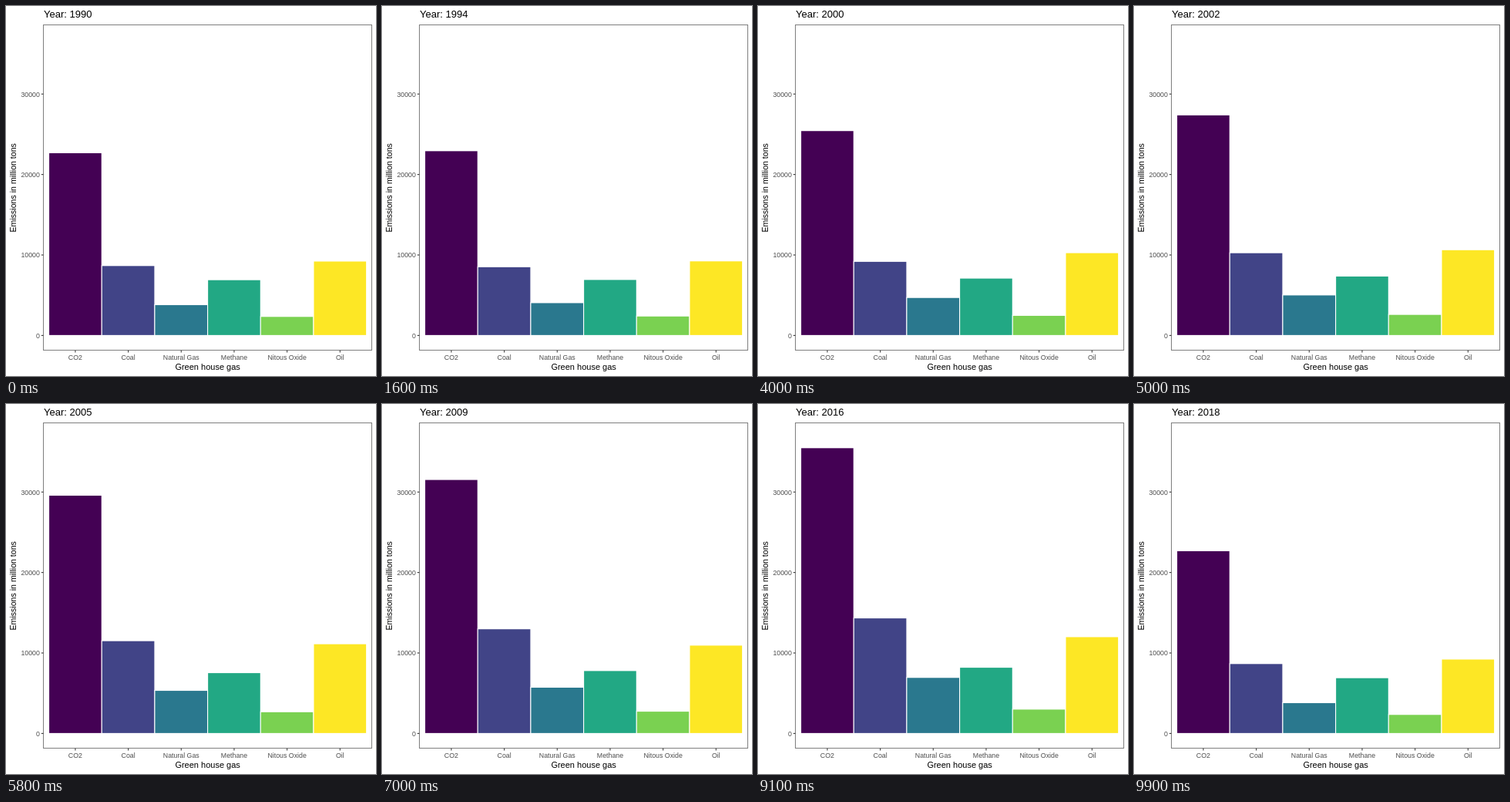
An HTML page with a canvas for the animation above (10 s loop, 480 by 480 pixels).

```html
<!DOCTYPE html>
<html lang="en">
<head>
<meta charset="utf-8">
<title>Emissions by year</title>
<style>
  html, body { margin: 0; width: 100%; height: 100%; overflow: hidden; background: #fff; }
  canvas { display: block; width: 480px; height: 480px; }
</style>
</head>
<body>
<canvas id="chart" width="480" height="480"></canvas>
<script>
const ctx = document.getElementById('chart').getContext('2d');
const FONT = '"Liberation Sans", Arial, sans-serif';
const LOOP = 10000, STEP = 100, FIRST = 1990, YEARS = 29;
const LEFT = 55.57, BAR = 68.68, ZERO = 427.4, PER_K = 10.44;

// Key years, and each gas in thousand million tons at those years
const KEYS = [1990, 1994, 2000, 2002, 2005, 2009, 2012, 2016, 2018];
const gases = [
  { name: 'CO2', color: '#440154', points: [22.7, 22.95, 25.45, 26.3, 29.6, 31.55, 35, 35.5, 36.8] },
  { name: 'Coal', color: '#414487', points: [8.68, 8.53, 9.2, 9.65, 11.52, 13, 14.8, 14.35, 14.75] },
  { name: 'Natural Gas', color: '#2A788E', points: [3.82, 4.07, 4.71, 4.87, 5.35, 5.74, 6.45, 6.96, 7.48] },
  { name: 'Methane', color: '#22A884', points: [6.92, 6.95, 7.12, 7.29, 7.55, 7.81, 8, 8.22, 8.3] },
  { name: 'Nitous Oxide', color: '#7AD151', points: [2.36, 2.41, 2.49, 2.57, 2.69, 2.76, 2.87, 3.02, 3.06] },
  { name: 'Oil', color: '#FDE725', points: [9.24, 9.26, 10.28, 10.4, 11.14, 10.97, 11.5, 12.02, 12.29] }
];

function valueIn(year, points) {
  const k = Math.max(1, KEYS.findIndex(key => key >= year));
  const f = (year - KEYS[k - 1]) / (KEYS[k] - KEYS[k - 1]);
  return points[k - 1] + f * (points[k] - points[k - 1]);
}

// Steps per year; in the last one the bars already show the next year
const stepsIn = i => i < 12 || i === 13 ? 4 : 3;

function stateAt(ms) {
  let step = Math.floor((ms % LOOP) / STEP), i = 0;
  while (step >= stepsIn(i)) step -= stepsIn(i++);
  const ahead = step === stepsIn(i) - 1 ? 1 : 0;
  return { year: FIRST + i, barYear: FIRST + (i + ahead) % YEARS };
}

function text(str, x, y, size, color, align) {
  ctx.font = `${size}px ${FONT}`;
  ctx.fillStyle = color;
  ctx.textAlign = align;
  ctx.fillText(str, x, y);
}

function line(x1, y1, x2, y2) {
  ctx.beginPath();
  ctx.moveTo(x1, y1);
  ctx.lineTo(x2, y2);
  ctx.stroke();
}

// Fill on whole pixels, outline at the exact position
function bar(x, y, w, h, color) {
  const left = Math.round(x), top = Math.round(y);
  ctx.fillStyle = color;
  ctx.fillRect(left, top, Math.round(x + w) - left, Math.round(y + h) - top);
  ctx.strokeRect(x, y, w, h);
}

function drawBars(year) {
  ctx.lineWidth = 1.07;
  ctx.strokeStyle = '#fff';
  gases.forEach(({ color, points }, i) => {
    const h = valueIn(year, points) * PER_K;
    bar(LEFT + i * BAR, ZERO - h, BAR, h, color);
  });
}

function drawAxes() {
  ctx.lineWidth = 1;
  ctx.strokeStyle = '#7f7f7f';
  ctx.strokeRect(48.5, 24.5, 426, 422);
  ctx.lineWidth = 1.07;
  ctx.strokeStyle = '#333';
  for (let v = 0; v <= 30; v += 10) {
    const y = ZERO - v * PER_K;
    line(45.8, y, 48.5, y);
    text(v * 1000, 43.9, y + 3.4, 8.8, '#4d4d4d', 'right');
  }
  gases.forEach(({ name }, i) => {
    const x = LEFT + (i + 0.5) * BAR;
    line(x, 446.8, x, 449.5);
    text(name, x, 459, 8.8, '#4d4d4d', 'center');
  });
  text('Green house gas', 261.6, 472, 11, '#000', 'center');
  ctx.save();
  ctx.translate(13, 235.8);
  ctx.rotate(-Math.PI / 2);
  text('Emissions in million tons', 0, 0, 10.6, '#000', 'center');
  ctx.restore();
}

function draw(ms) {
  const { year, barYear } = stateAt(ms);
  ctx.fillStyle = '#fff';
  ctx.fillRect(0, 0, 480, 480);
  drawBars(barYear);
  drawAxes();
  text('Year: ' + year, 49, 15, 13, '#000', 'left');
}

const start = performance.now();
function tick() {
  draw(performance.now() - start);
  requestAnimationFrame(tick);
}
tick();
</script>
</body>
</html>
```
